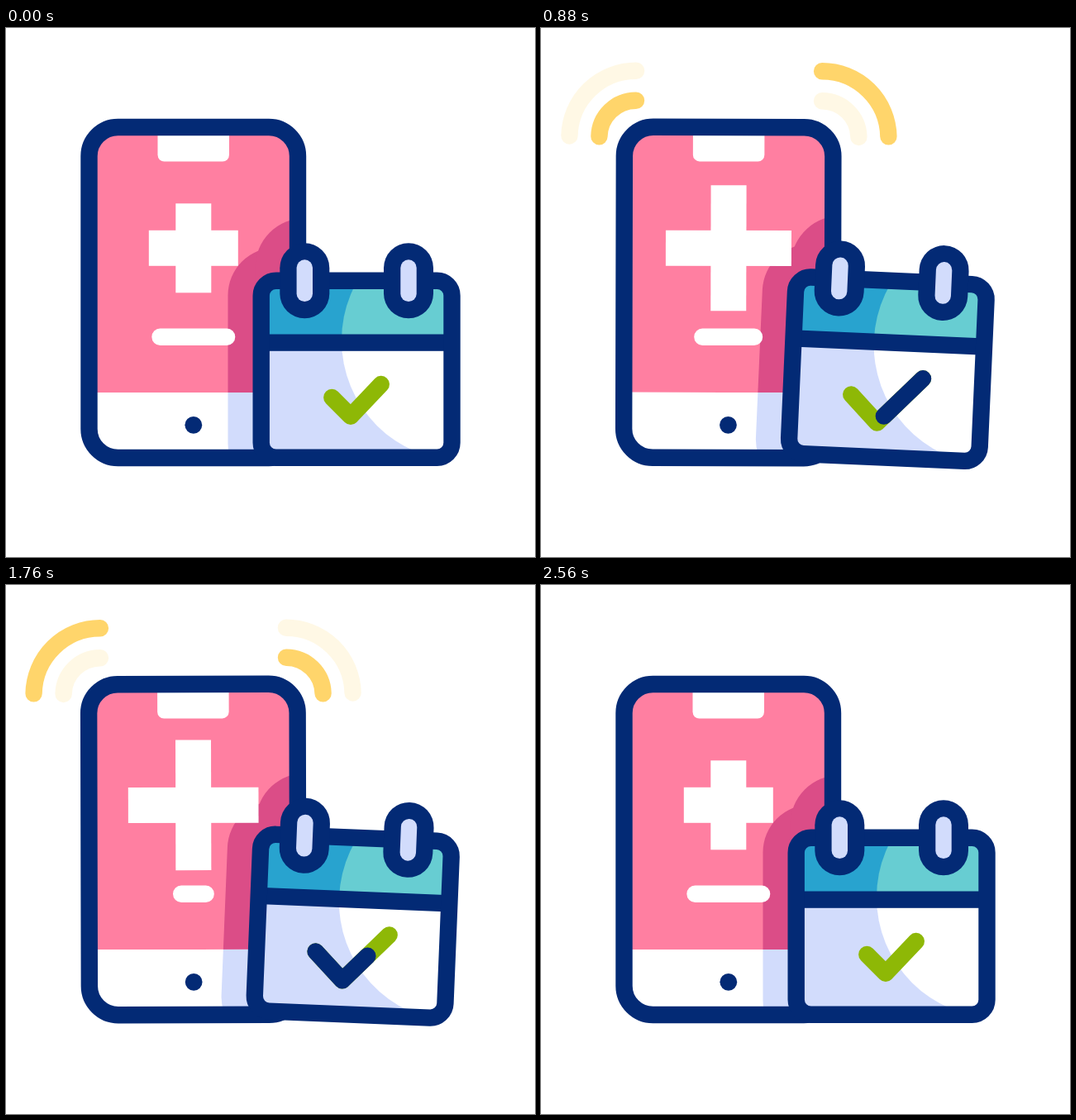
These frames come from a looping animation (640x640 px, 3 s). An HTML page with a canvas:

```html
<!DOCTYPE html>
<html lang="en">
<head>
<meta charset="utf-8">
<title>Health appointment</title>
<style>
html, body { margin: 0; width: 100%; height: 100%; overflow: hidden; background: #fff; }
canvas { display: block; width: 640px; height: 640px; }
</style>
</head>
<body>
<canvas id="stage" width="640" height="640"></canvas>
<script>
const ctx = document.getElementById('stage').getContext('2d');
const LOOP = 3000, STEP = 40;
const NAVY = '#032a75', PINK = '#ff7fa1', DARK_PINK = '#db4d87', LAVENDER = '#d2dcfc';
const TEAL = '#67cdd2', BLUE = '#28a3cf', GREEN = '#8eb806', YELLOW = '#ffce52', WHITE = '#fff';

// Eased rise from 0 to 1 between two times.
function ramp(t, start, duration) {
  const u = Math.min(1, Math.max(0, (t - start) / duration));
  return u < 0.5 ? 4 * u ** 3 : 1 - 4 * (1 - u) ** 3;
}

// Two rises and falls per loop, one period apart.
function pulses(t, start, half, period) {
  const one = s => ramp(t, s, half) - ramp(t, s + half, half);
  return one(start) + one(start + period);
}

// The calendar swings out, across and back, dying down.
function calendarAngle(t) {
  const times = [131, 651, 1171, 1657, 1911, 2560], angles = [0, 8, -8, 5, -5, 0];
  return times.slice(1).reduce((sum, end, i) =>
    sum + (angles[i + 1] - angles[i]) * ramp(t, times[i], end - times[i]), 0);
}

// The phone shakes steadily between a soft start and stop.
function phoneAngle(t) {
  const envelope = ramp(t, 90, 176) - ramp(t, 2165, 176);
  return 3.5 * envelope * Math.cos(Math.PI * (t - 90) / 176);
}

function poseAt(t) {
  const fade = start => ramp(t, start, 350);
  const beat = pulses(t, 110, 590, 1180);
  const rest = 1 - ramp(t, 100, 130) + ramp(t, 1880, 590);
  const swapped = fade(763) - fade(1643);
  const lit = fade(420) * (1 - swapped);
  const inkTime = t < 1300 ? t : t - 1300;
  return {
    phone: phoneAngle(t),
    calendar: calendarAngle(t),
    plus: 45 + 35 * beat + 9 * rest,
    line: 57.5 - 33 * pulses(t, 120, 505, 1210) - 7 * rest,
    checkScale: 1 + 0.5 * beat,
    inkHead: ramp(inkTime, 168, 500),
    inkTail: ramp(inkTime, 635, 500),
    leftOuter: swapped,
    rightInner: swapped,
    leftInner: lit * (1 - fade(1850)),
    rightOuter: lit * (1 - fade(2123))
  };
}

function group(draw) {
  ctx.save();
  draw();
  ctx.restore();
}

function rotateAbout(x, y, degrees) {
  ctx.translate(x, y);
  ctx.rotate(degrees * Math.PI / 180);
  ctx.translate(-x, -y);
}

function rect(x, y, w, h, color) {
  ctx.fillStyle = color;
  ctx.fillRect(x, y, w, h);
}

function rounded(x, y, w, h, r, color) {
  ctx.beginPath();
  ctx.roundRect(x, y, w, h, r);
  ctx.fillStyle = color;
  ctx.fill();
}

function disc(x, y, r, color) {
  ctx.beginPath();
  ctx.arc(x, y, r, 0, 7);
  ctx.fillStyle = color;
  ctx.fill();
}

function outline(color) {
  ctx.strokeStyle = color;
  ctx.lineWidth = 20.4;
  ctx.lineCap = ctx.lineJoin = 'round';
  ctx.stroke();
}

function frame(x, y, w, h, r) {
  ctx.beginPath();
  ctx.roundRect(x, y, w, h, r);
  outline(NAVY);
}

// A quarter ring beside the phone; side is -1 for left, 1 for right.
function soundWave(side, radius, alpha) {
  group(() => {
    ctx.globalAlpha = alpha;
    ctx.translate(227 + side * 112.5, 132.5);
    ctx.scale(side, 1);
    ctx.beginPath();
    ctx.arc(0, 0, radius, -Math.PI / 2, -0.02);
    outline(YELLOW);
  });
}

function turnCalendar(angle) {
  rotateAbout(424, 305.5, angle);
}

// The calendar outline grown by 30, cast on the phone.
function castShadow(color) {
  rounded(268.5, 265.5, 311, 295, 58, color);
  rounded(301.5, 230, 120, 151, 60, color);
}

function drawPhone(pose) {
  const { phone, calendar, plus, line } = pose;
  const turnPhone = () => rotateAbout(227, 320, phone);

  group(() => {
    turnPhone();
    soundWave(-1, 80.5, pose.leftOuter);
    soundWave(-1, 44.5, pose.leftInner);
    soundWave(1, 80.5, pose.rightOuter);
    soundWave(1, 44.5, pose.rightInner);
    rounded(100.5, 120, 252.5, 400, 35, WHITE);
  });

  const shadedArea = (y, h, base, shade) => group(() => {
    turnPhone();
    ctx.beginPath();
    ctx.roundRect(105, 125, 243.5, 390, 31);
    ctx.clip();
    ctx.beginPath();
    ctx.rect(100, y, 253, h);
    ctx.clip();
    rect(100, y, 253, h, base);
    rotateAbout(227, 320, -phone);
    turnCalendar(calendar);
    castShadow(shade);
  });
  shadedArea(120, 321, PINK, DARK_PINK);
  shadedArea(441, 79, WHITE, LAVENDER);

  group(() => {
    turnPhone();
    rounded(183.5, 125, 86.5, 36.5, [0, 0, 8, 8], WHITE);
    rect(205.3, 266.3 - plus, 43, plus * 2, WHITE);
    rect(226.8 - plus, 244.8, plus * 2, 43, WHITE);
    rounded(226.8 - line, 363.5, line * 2, 20.5, 10.2, WHITE);
    disc(226.8, 480.3, 10.4, NAVY);
    frame(100.5, 120, 252.5, 400, 35);
  });
}

// Strokes the part of the check mark between two shares of its length.
function strokeCheck(scale, from, to, color) {
  const corner = 0.377;
  const along = s => {
    const x = s < corner ? 394.3 + 22.7 * s / corner : 417 + 36.8 * (s - corner) / (1 - corner);
    const y = s < corner ? x + 52.7 : 469.7 - 1.05 * (x - 417);
    return [423.5 + (x - 423.5) * scale, 450.5 + (y - 450.5) * scale];
  };
  ctx.beginPath();
  ctx.moveTo(...along(from));
  if (from < corner && to > corner) ctx.lineTo(...along(corner));
  ctx.lineTo(...along(to));
  outline(color);
}

function drawCalendar({ calendar, checkScale, inkHead, inkTail }) {
  const panels = (head, body) => {
    rect(300, 300, 250, 80, head);
    rect(300, 380, 250, 145, body);
  };
  group(() => {
    turnCalendar(calendar);
    group(() => {
      ctx.beginPath();
      ctx.roundRect(308.5, 305.5, 231, 214.5, 18);
      ctx.clip();
      panels(BLUE, LAVENDER);
      ctx.beginPath();
      ctx.arc(551.5, 378, 145.5, 0, 7);
      ctx.clip();
      panels(TEAL, WHITE);
    });
    rect(308, 370.5, 232, 20.3, NAVY);
    frame(308.7, 305.8, 230.8, 214, 18);
    for (const x of [361.3, 487]) {
      rounded(x - 30, 260.3, 60, 91, 30, NAVY);
      rounded(x - 9.7, 280.3, 19.4, 50.8, 9.7, LAVENDER);
    }
    strokeCheck(checkScale, 0, 1, GREEN);
    if (inkHead - inkTail > 0.001) strokeCheck(checkScale, inkTail, inkHead, NAVY);
  });
}

function render(now) {
  const pose = poseAt(Math.floor((now % LOOP) / STEP) * STEP);
  rect(0, 0, 640, 640, WHITE);
  drawPhone(pose);
  drawCalendar(pose);
}

const start = performance.now();
function tick() {
  render(performance.now() - start);
  requestAnimationFrame(tick);
}
tick();
</script>
</body>
</html>
```
